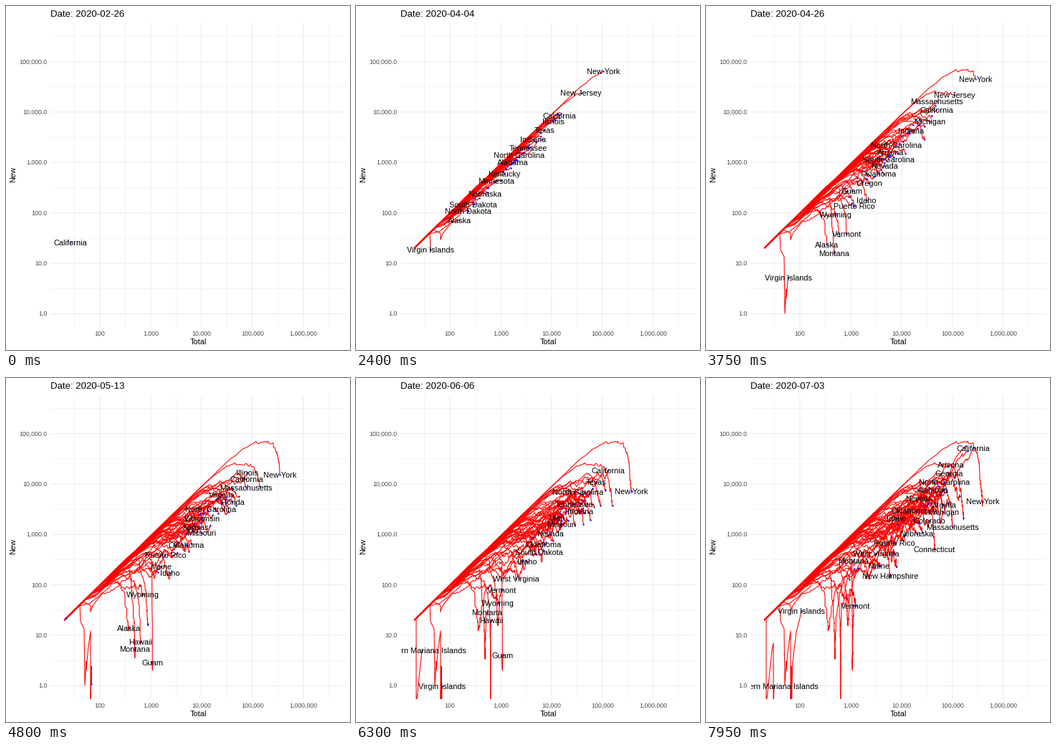
A matplotlib script that plays this animation: 480x480 px, repeating every 8 s.

```python
import numpy as np
import matplotlib.pyplot as plt
from matplotlib.animation import FuncAnimation
from matplotlib.collections import LineCollection

plt.rcParams["font.family"] = "Liberation Sans"
SIZE, PX = 480, 0.72                      # stage size, points per pixel at 100 dpi
LEFT, RIGHT, TOP, BOTTOM = 62.5, 474.5, 24, 448
PACE = 240 / 99                           # days per step
KEY_STEPS = (16, 25, 32, 42, 53)
KEYS = [s * PACE for s in KEY_STEPS]
rng = np.random.default_rng(7)
trails = []                               # (name, days, xs, ys)


def to_x(total):
    return 131 + 70.9 * (np.log10(total) - 2)


def to_y(new):
    return 429.5 - 70.4 * np.log10(new)


def state(name, start, *levels, extra=None):
    """Weekly cases pass through the levels at KEYS; totals are their running sum."""
    extra = extra or {}
    knots = dict(zip(KEYS, levels))
    if start not in extra:
        for u in np.linspace(0, 1, 12, endpoint=False):
            day = start + u * (KEYS[0] - start)
            knots[day] = 20 * (levels[0] / 20) ** (1 - (1 - u) ** 1.8)
    knots.update(extra)
    at = sorted(knots)
    days = np.arange(start, 131)
    log_new = np.interp(days, at, [np.log10(knots[d]) for d in at])

    wobble = np.convolve(rng.normal(size=len(days) + 6), np.ones(7) / 7, "valid")
    wobble *= (0.12 + 0.3 / 10 ** (log_new / 2)) * np.clip((days - start) / 15, 0, 1)
    pins = [start, *KEYS]
    wobble -= np.interp(days, pins, np.interp(pins, days, wobble))

    new = 10 ** (log_new + wobble)
    total = new.copy()
    for i in range(7, len(days)):
        total[i] += total[i - 7]
    trails.append((name, days, to_x(np.maximum.accumulate(total)), to_y(new)))


def drawn(name, *points):
    trails.append((name, *np.array(points, float).T))


state("California", 0, 8700, 10960, 12490, 18500, 52500,
      extra={0: 26, 6: 45, 9: 29, 19.4: 540, 29: 3300})
state("New York", 10.1, 64000, 45000, 15200, 7150, 4530, extra={46: 71000, 55: 60000})
state("New Jersey", 13.9, 24000, 21800, 9000, 3700, 2150)
state("Massachusetts", 15, 7200, 16760, 8440, 3800, 1400)
state("Michigan", 17, 9000, 6500, 3700, 1900, 2780)
state("Illinois", 14, 6500, 13700, 16760, 7700, 5700)
state("Texas", 14.5, 4400, 5600, 8300, 10960, 45000)
state("Florida", 13, 7000, 5100, 4390, 8000, 57000)
state("Georgia", 13.5, 3900, 4700, 4300, 4600, 16200)
state("Pennsylvania", 14.5, 7600, 8500, 5700, 3500, 4300)
state("Louisiana", 14, 9500, 2800, 2800, 2700, 8000)
state("Washington", 1.7, 2900, 1500, 1500, 1900, 4200)
state("Colorado", 11.5, 2500, 3700, 2600, 1550, 1880)
state("Connecticut", 16, 3300, 6900, 3400, 1600, 508)
state("Indiana", 18.5, 2870, 4250, 4100, 2870, 2700)
state("Tennessee", 15, 1920, 2600, 2400, 3980, 9000)
state("North Carolina", 17.2, 1400, 2200, 3165, 6930, 10960)
state("South Carolina", 16, 1000, 1150, 1150, 2600, 10800)
state("Virginia", 15, 1900, 3900, 6090, 6800, 3860)
state("Alabama", 18.5, 1000, 1400, 2000, 2900, 7650)
state("Arizona", 19.3, 1150, 1600, 2600, 6900, 24000)
state("Kentucky", 17, 600, 1150, 1300, 1800, 1700)
state("Minnesota", 15, 430, 1200, 4300, 3100, 2900)
state("Wisconsin", 16.5, 1100, 1400, 2070, 2700, 3800)
state("Missouri", 19.5, 1500, 1250, 1070, 1600, 2900)
state("Kansas", 20, 650, 1200, 1400, 750, 2000)
state("Utah", 18, 900, 1150, 1150, 2140, 3900)
state("Nevada", 16, 1000, 857, 650, 1040, 5200)
state("Oklahoma", 20, 760, 600, 617, 638, 2980)
state("Oregon", 13, 450, 390, 430, 420, 1600)
state("Nebraska", 18, 240, 1700, 2500, 1500, 1040)
state("South Dakota", 21, 147, 500, 900, 446, 420)
state("North Dakota", 22, 109, 270, 390, 300, 240)
state("Idaho", 20, 680, 178, 172, 290, 2080)
state("Puerto Rico", 23, 330, 133, 390, 900, 681)
state("Maine", 18, 260, 155, 232, 290, 240)
state("West Virginia", 25, 190, 210, 180, 133, 416)
state("New Hampshire", 16, 400, 470, 700, 400, 151)
state("Wyoming", 22, 110, 93, 65, 43.5, 220)
state("Vermont", 19, 320, 38, 16, 81, 38)
state("Montana", 23, 155, 15.6, 5.9, 29, 310, extra={74: 3, 81: 3})
state("Alaska", 22, 71, 23.5, 14, 90, 210, extra={46: 95, 52: 70, 70: 11})
state("Hawaii", 21, 200, 35, 8, 20.5, 130, extra={88: 0.4})
state("Guam", 21, 150, 300, 3, 4, 40, extra={74: 2})

drawn("Virgin Islands", (26, 82, 337), (31, 103, 316), (38.8, 104, 340), (47, 109, 350),
      (51, 110, 429), (54, 112, 395), (56, 112, 408), (60.6, 114.5, 379), (67, 118, 353),
      (69, 118, 460), (74, 119, 402), (78, 119.5, 430), (90, 119.5, 460),
      (101.8, 120, 430), (108, 121, 395), (118, 126, 355), (128.5, 133.5, 325))
drawn("Northern Mariana Islands", (66, 82, 337), (79, 84, 335), (82, 84, 460),
      (90, 85, 448), (101.8, 92, 380), (110, 94, 370), (114, 94, 460), (124, 94, 460),
      (128.5, 95, 430))

for _ in range(10):
    walk = rng.uniform(2.6, 3.3) + np.cumsum(rng.normal(0.1, 0.18, 5))
    state("", rng.uniform(14, 20), *10 ** np.minimum(walk, 3.9))

SHOWN = {
    8: "New York,California,New Jersey,Colorado,Massachusetts,Michigan,North Carolina,"
       "Indiana,Arizona",
    16: "New York,New Jersey,California,Illinois,Texas,Indiana,Tennessee,North Carolina,"
        "Alabama,Kentucky,Minnesota,Nebraska,South Dakota,North Dakota,Alaska,Virgin Islands",
    25: "New York,New Jersey,Massachusetts,California,Michigan,Indiana,North Carolina,Arizona,"
        "South Carolina,Nevada,Oklahoma,Oregon,Guam,Idaho,Puerto Rico,Wyoming,Vermont,Alaska,"
        "Montana,Virgin Islands",
    32: "California,New York,Illinois,Massachusetts,Virginia,Florida,North Carolina,Wisconsin,"
        "Kansas,Missouri,Oklahoma,Puerto Rico,Maine,Idaho,Wyoming,Alaska,Hawaii,Montana,Guam",
    42: "California,New York,Texas,North Carolina,Tennessee,Indiana,Utah,Missouri,Nevada,"
        "Oklahoma,South Dakota,Idaho,West Virginia,Vermont,Wyoming,Montana,Hawaii,Guam,"
        "Northern Mariana Islands,Virgin Islands",
    53: "California,New York,Arizona,Georgia,North Carolina,Alabama,Nevada,Virginia,Oklahoma,"
        "Michigan,Idaho,Colorado,Massachusetts,Nebraska,Puerto Rico,Connecticut,West Virginia,"
        "Montana,Maine,New Hampshire,Vermont,Virgin Islands,Northern Mariana Islands",
}
SHOWN = {step: names.split(",") for step, names in SHOWN.items()}


def pixel_axes(left, right, top, bottom):
    ax = fig.add_axes([left / SIZE, 1 - bottom / SIZE,
                       (right - left) / SIZE, (bottom - top) / SIZE])
    ax.set(xlim=(left, right), ylim=(bottom, top))
    ax.axis("off")
    return ax


fig = plt.figure(figsize=(4.8, 4.8), dpi=100, facecolor="white")
page = pixel_axes(0, SIZE, 0, SIZE)
panel = pixel_axes(LEFT, RIGHT, TOP, BOTTOM)


def write(x, y, text, size, color="black", ha="center", **kw):
    return page.text(x, y, text, fontsize=size * PX, color=color, ha=ha,
                     va="baseline", **kw)


def grid_line(xs, ys, width):
    page.plot(xs, ys, color="#EBEBEB", lw=width * PX, solid_capstyle="butt", snap=False)


for half in range(3, 14):
    x = to_x(10 ** (half / 2))
    grid_line([x, x], [TOP, BOTTOM], 0.55 if half % 2 else 1.07)
for half in range(12):
    y = to_y(10 ** (half / 2))
    grid_line([LEFT, RIGHT], [y, y], 0.55 if half % 2 else 1.07)
for k in range(2, 7):
    write(to_x(10 ** k), 460, f"{10 ** k:,}", 8.8, "#4D4D4D")
for k in range(6):
    write(57.6, to_y(10 ** k) + 3, f"{10 ** k:,.1f}", 8.8, "#4D4D4D", "right")
write(268.3, 472.5, "Total", 11)
page.text(10, 235, "New", fontsize=11 * PX, rotation=90, ha="center", va="center")
title = write(62.5, 15, "", 13.2, ha="left")

paths = LineCollection([], colors="red", linewidths=1.07 * PX, zorder=2)
panel.add_collection(paths, autolim=False)
dots, = panel.plot([], [], "o", color="blue", ms=2.3 * PX, mew=0, zorder=3)
labels = {name: panel.text(0, 0, name, fontsize=11 * PX, ha="center", va="baseline",
                           clip_on=True, zorder=4)
          for name, *_ in trails if name}


def clashes(a, b):
    reach = 2.5 * (len(a[0]) + len(b[0]))
    return abs(a[1] - b[1]) < reach and abs(a[2] - b[2]) < 6.5


def draw(frame):
    step = frame // 3
    now = step * PACE
    title.set_text(f"Date: {np.datetime64('2020-02-26') + int(now)}")

    segments, tips, heads = [], {}, []
    for name, days, xs, ys in trails:
        if days[0] > now:
            continue
        tip = np.interp(now, days, xs), np.interp(now, days, ys)
        past = days < now
        segments.append(np.vstack([np.column_stack([xs[past], ys[past]]), tip]))
        heads.append(tip)
        tips[name] = tip
    paths.set_segments(segments)
    dots.set_data(*zip(*heads))

    for text in labels.values():
        text.set_visible(False)
    placed = []
    for name in SHOWN[min(SHOWN, key=lambda key: abs(key - step))]:
        if name not in tips:
            continue
        spot = (name, *tips[name])
        if not any(clashes(spot, other) for other in placed):
            placed.append(spot)
            labels[name].set_position((spot[1], spot[2] + 4))
            labels[name].set_visible(True)
    return paths, dots, title


anim = FuncAnimation(fig, draw, frames=160, interval=50, init_func=lambda: draw(0),
                     repeat=True, repeat_delay=0)
plt.show()
```
